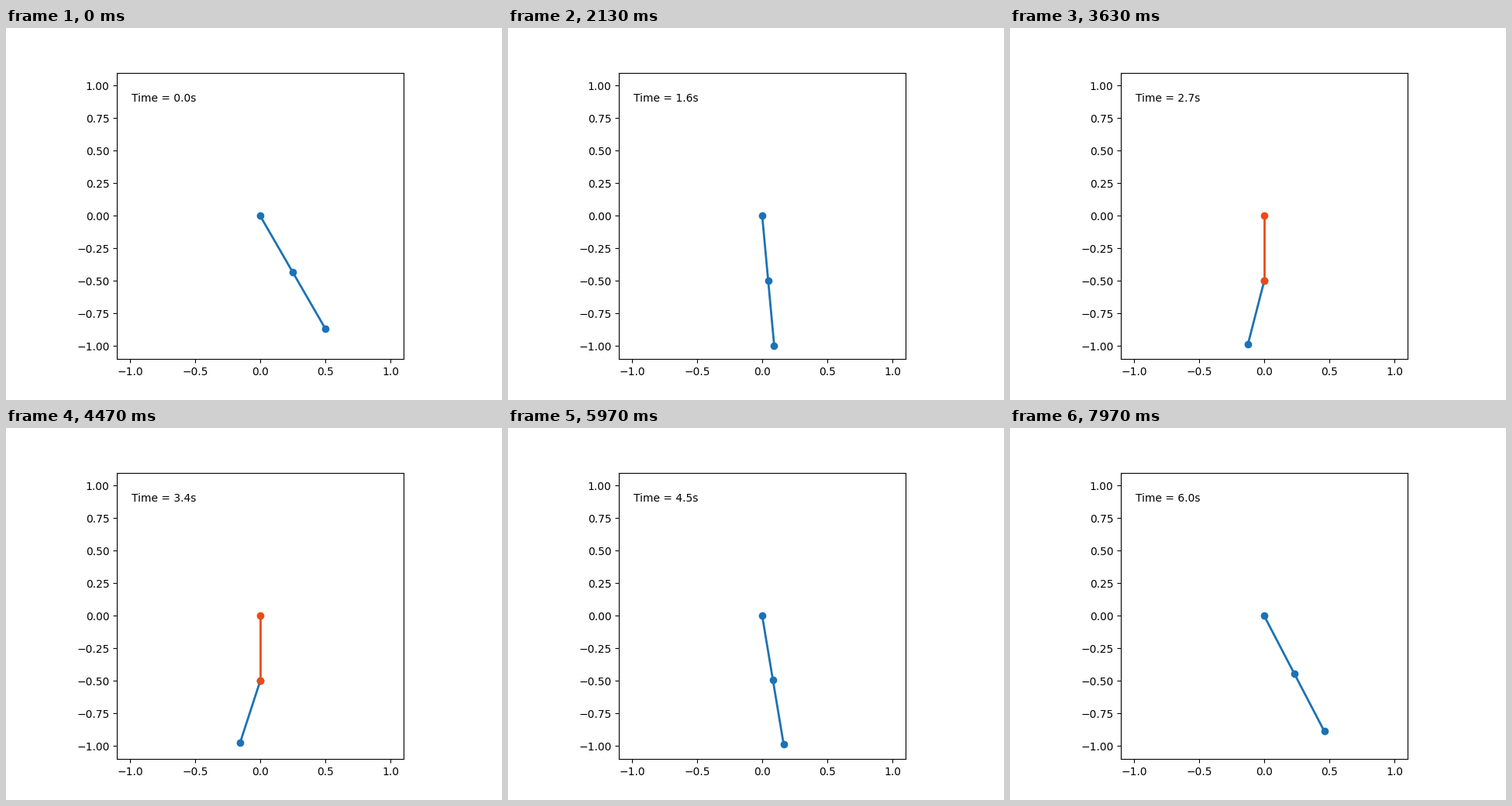
A matplotlib script for the animation above (8 s loop, 640 by 480 pixels).

```python
import math

import matplotlib.pyplot as plt
from matplotlib.animation import FuncAnimation

G = 9.81
LENGTH = 1.0
PEG = 0.5
DT = 0.025
FRAMES = 240
LOOP_MS = 8000
BLUE = "#1b72b6"
RED = "#ea4c15"


def swing(angle, steps):
    """Angles of a plain pendulum, stepped with semi-implicit Euler."""
    speed = 0.0
    angles = []
    for _ in range(steps):
        angles.append(angle)
        speed -= G / LENGTH * math.sin(angle) * DT
        angle += speed * DT
    return angles


angles = swing(math.radians(30), FRAMES)

fig = plt.figure(figsize=(6.4, 4.8), dpi=100)
ax = fig.add_subplot(autoscale_on=False, xlim=(-1.1, 1.1), ylim=(-1.1, 1.1))
ax.set_aspect("equal")

rod, = ax.plot([], [], "o-", lw=2, color=BLUE)
caught, = ax.plot([], [], "o-", lw=2, color=RED)
label = ax.text(0.05, 0.9, "", transform=ax.transAxes)


def update(i):
    a = angles[i]
    sx, sy = math.sin(a), -math.cos(a)
    if a >= 0:
        rod.set_data([0, PEG * sx, LENGTH * sx], [0, PEG * sy, LENGTH * sy])
        caught.set_data([], [])
    else:
        # The peg holds the upper half upright; only the lower half swings.
        free = LENGTH - PEG
        rod.set_data([0, free * sx], [-PEG, -PEG + free * sy])
        caught.set_data([0, 0], [0, -PEG])
    label.set_text(f"Time = {i * DT:.1f}s")
    return rod, caught, label


def reset():
    return update(0)


anim = FuncAnimation(fig, update, frames=FRAMES, init_func=reset,
                     interval=LOOP_MS / FRAMES, repeat=True, repeat_delay=0)
plt.show()
```
